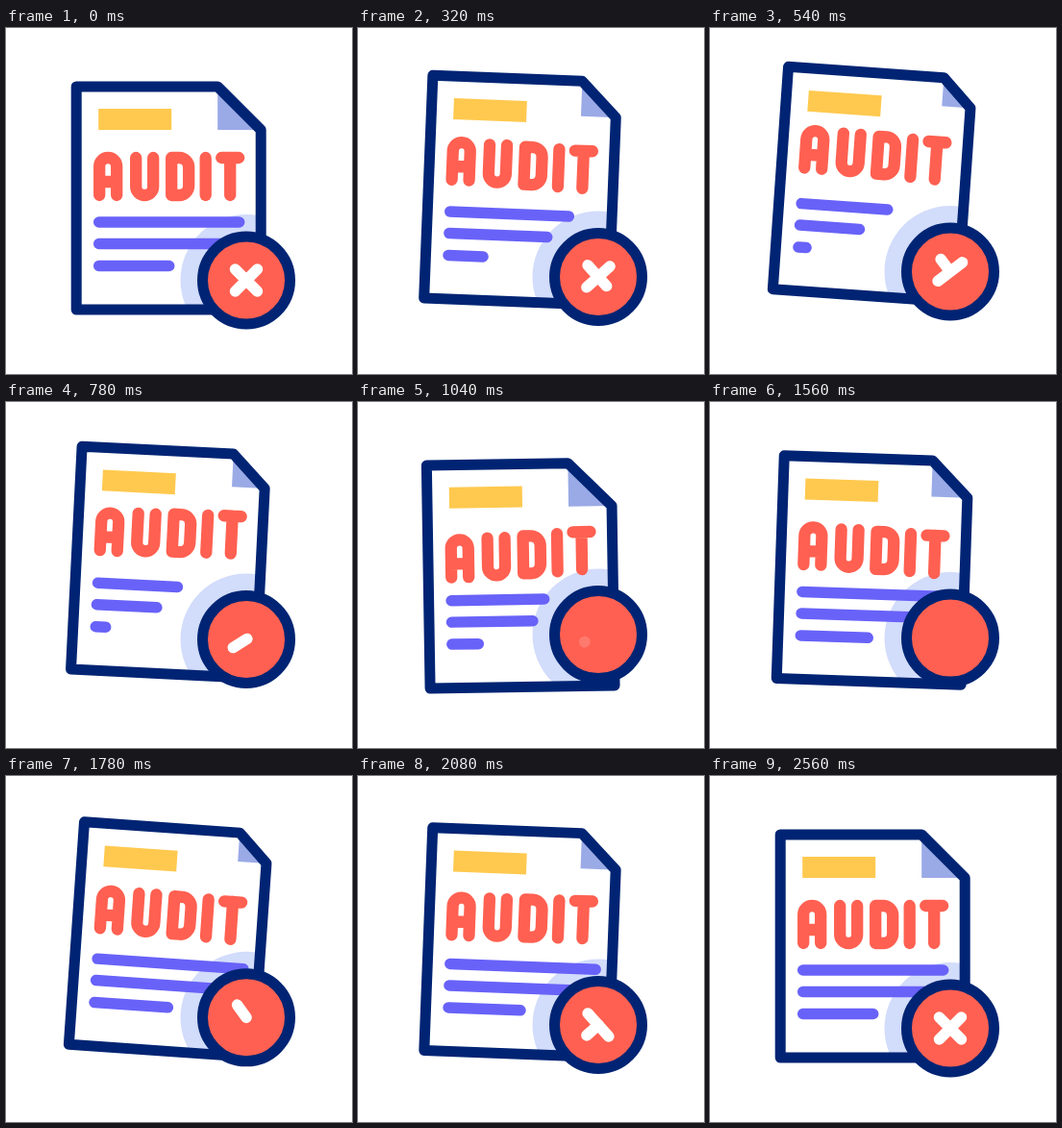
An HTML page with a canvas that plays this animation: 360x360 px, repeating every 2.62 s.

```html
<!DOCTYPE html>
<html lang="en">
<head>
<meta charset="utf-8">
<title>Audit rejected</title>
<style>
  html, body { margin: 0; width: 100%; height: 100%; overflow: hidden; background: #fff; }
  canvas { display: block; width: 360px; height: 360px; }
</style>
</head>
<body>
<canvas role="img" aria-label="AUDIT"></canvas>
<script>
const LOOP = 2620, BEAT = 600;
const NAVY = '#002473', RED = '#ff6051', PURPLE = '#6862f8';
const canvas = document.querySelector('canvas');
const ctx = canvas.getContext('2d');
const ratio = window.devicePixelRatio || 1;
canvas.width = canvas.height = 360 * ratio;

// Sine ease from 0 to 1 between two times.
function ramp(t, from, to) {
  const p = Math.min(1, Math.max(0, (t - from) / (to - from)));
  return (1 - Math.cos(Math.PI * p)) / 2;
}

// Starts at rest, swings through one peak per beat and returns to rest.
function swing(t, ...peaks) {
  let value = 0;
  [...peaks, 0].forEach((peak, i, all) => {
    value += (peak - (all[i - 1] || 0)) * ramp(t, i * BEAT, (i + 1) * BEAT);
  });
  return value;
}

// Rises to 1 over two beats, then falls back.
const arch = t => ramp(t, 0, 2 * BEAT) - ramp(t, 2 * BEAT, 4 * BEAT);

const LINES = [
  { y: 202, length: 146, drop: 0.44 },
  { y: 224.5, length: 146, drop: 0.6 },
  { y: 247.5, length: 73, drop: 0.91 }
];
const LETTERS = [
  'M97 174V144A9 9 0 0 1 115 144V174M97 160H115',
  'M135 135V165A9 9 0 0 0 153 165V135',
  'M172 135H180A10 10 0 0 1 190 145V164A10 10 0 0 1 180 174H172Z',
  'M207.5 135V174',
  'M224 135H242M233 135V174'
].map(d => new Path2D(d));

function stroke(color, width, path) {
  ctx.strokeStyle = color;
  ctx.lineWidth = width;
  path ? ctx.stroke(path) : ctx.stroke();
}

function segment(x0, y0, x1, y1, color) {
  ctx.beginPath();
  ctx.moveTo(x0, y0);
  ctx.lineTo(x1, y1);
  stroke(color, 11.5);
}

function disc(x, y, r, color) {
  ctx.beginPath();
  ctx.arc(x, y, r, 0, 2 * Math.PI);
  ctx.fillStyle = color;
  ctx.fill();
}

// Shrinks within a beat, regrows a little too long over two, then settles.
function lineLength({ length, drop }, i, t) {
  const start = t - 20 * (2 - i) ** 2;
  const extra = 0.05;
  return length * (1 - drop * ramp(start, 0, BEAT)
    + (drop + extra) * ramp(start, BEAT, 3 * BEAT)
    - extra * ramp(start, 3 * BEAT, 4 * BEAT));
}

function drawPage(t, badgeY) {
  const tilt = swing(t, 4.1, -1.9, 4);
  const fold = 45 - 3.8 * Math.max(0, tilt);
  const corner = 265 - fold;
  const page = new Path2D(`M73 61H${corner}L265 ${61 + fold}V293H73Z`);
  const place = () => {
    ctx.translate(169.2, 177 + swing(t, -14.6, 7, -6.8));
    ctx.rotate(tilt * Math.PI / 180);
    ctx.translate(-169, -177);
  };

  // The badge's halo shows only on the page.
  ctx.save();
  place();
  ctx.clip(page);
  ctx.setTransform(ratio, 0, 0, ratio, 0, 0);
  disc(250, badgeY, 68.5, '#d2dcfb');
  ctx.restore();

  ctx.save();
  place();
  ctx.fillStyle = '#ffc94f';
  ctx.fillRect(96, 84, 76, 22);
  ctx.fillStyle = '#9aaae6';
  ctx.fill(new Path2D(`M${corner} 61V${61 + fold}H265Z`));
  LINES.forEach((line, i) => {
    segment(96.5, line.y, 96.5 + lineLength(line, i, t), line.y, PURPLE);
  });
  stroke(NAVY, 11, page);
  LETTERS.forEach((letter, i) => {
    ctx.save();
    ctx.translate(0, swing(t - 40 * i, -9.5, 6.5, -4));
    stroke(RED, 12.3, letter);
    ctx.restore();
  });
  ctx.restore();
}

function drawBadge(t, y) {
  ctx.save();
  ctx.translate(250, y);
  disc(0, 0, 45.5, RED);
  stroke(NAVY, 11);
  ctx.rotate(arch(t) * Math.PI / 10);
  // Both strokes of the cross start on the left; the second follows later.
  [-11.5, 11.5].forEach((top, i) => {
    const start = t - 300 * i;
    const grown = 1 - ramp(start, 200, 785) + ramp(start, 1580, 1980);
    if (grown < 0.001) return;
    ctx.globalAlpha = Math.min(1, grown * 12);
    segment(-11.5, top, -11.5 + 23 * grown, top * (1 - 2 * grown), '#fff');
  });
  ctx.restore();
}

function draw(t) {
  const badgeY = 262.5 - 21.3 * arch(t);
  ctx.setTransform(ratio, 0, 0, ratio, 0, 0);
  ctx.fillStyle = '#fff';
  ctx.fillRect(0, 0, 360, 360);
  ctx.lineCap = ctx.lineJoin = 'round';
  drawPage(t, badgeY);
  drawBadge(t, badgeY);
}

const start = performance.now();
function loop() {
  draw((performance.now() - start) % LOOP);
  requestAnimationFrame(loop);
}
loop();
</script>
</body>
</html>
```
